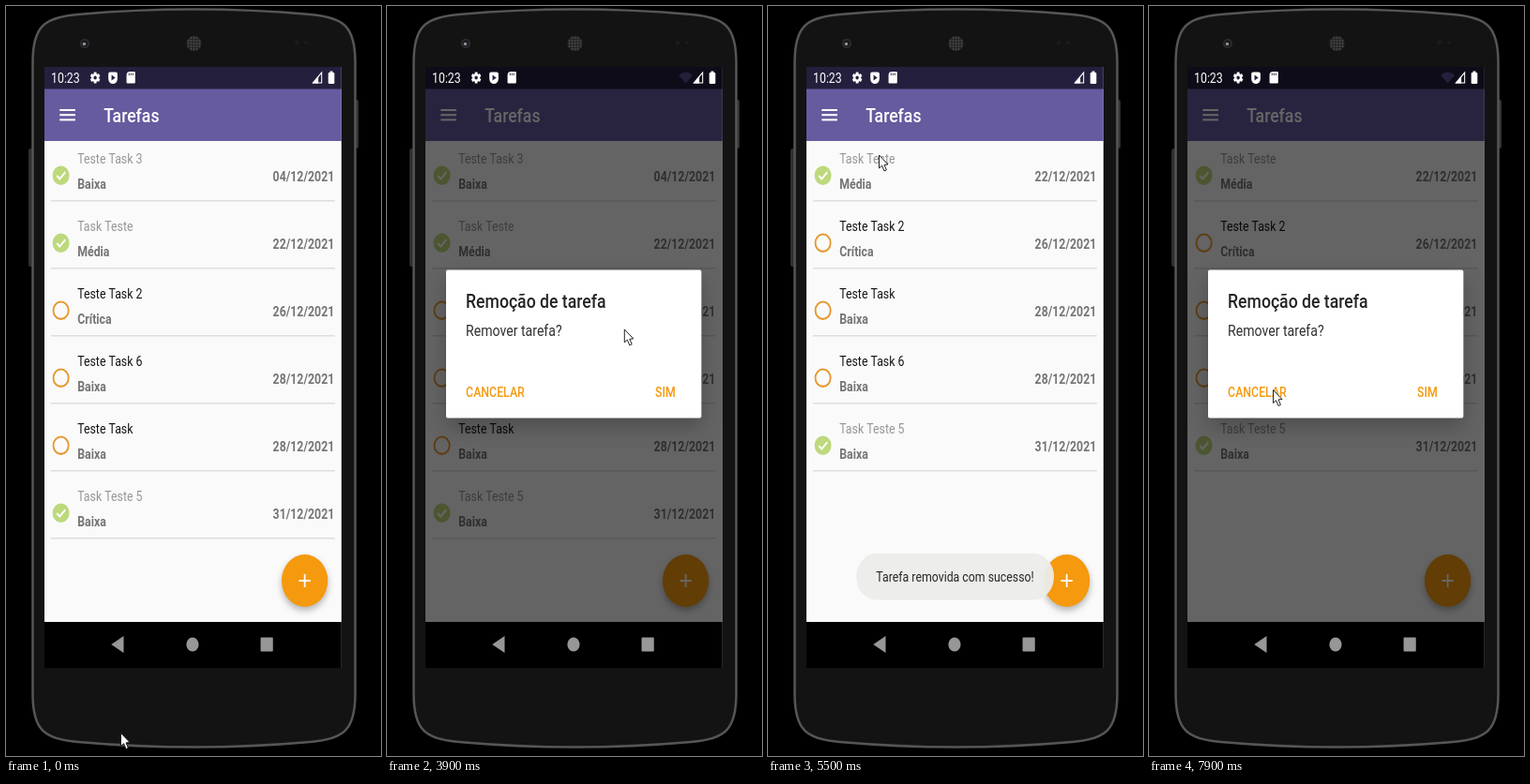
Animation of 400x800 px, one loop 8 s. Source, as an HTML page with a canvas:

```html
<!DOCTYPE html>
<html lang="pt">
<head>
<meta charset="utf-8">
<title>Tarefas</title>
<style>
html, body { margin: 0; width: 100%; height: 100%; overflow: hidden; background: #000; }
canvas { display: block; width: 400px; height: 800px; }
</style>
</head>
<body>
<canvas id="stage" width="400" height="800"></canvas>
<script>
const ctx = document.getElementById('stage').getContext('2d');
const LOOP = 8000, STEP = 100, ROW = 72;
const ORANGE = '#f5990e', GREEN = '#bdd97c', GREY = '#979797', WHITE = '#fff', BAR = '#241f3c';

const task = (title, priority, date, done) => ({ title, priority, date: date + '/12/2021', done });
const first = task('Teste Task 3', 'Baixa', '04', true);
const second = task('Task Teste', 'Média', '22', true);
const third = task('Teste Task 2', 'Crítica', '26', false);
const fourth = task('Teste Task 6', 'Baixa', '28', false);
const fifth = task('Teste Task', 'Baixa', '28', false);
const last = task('Task Teste 5', 'Baixa', '31', true);
const fullList = [first, second, third, fourth, fifth, last];
const reloadedList = [second, third, fifth, fourth, last];

// Timing
const ramp = (t, start, length) => Math.min(1, Math.max(0, (t - start) / length));
const RELOAD = 4800;

function dialogState(t) {
  const opening = t < RELOAD ? ramp(t, 2900, 200) : ramp(t, 6700, 200);
  const closing = t < RELOAD + STEP ? 1 - ramp(t, 4500, 300) ** 2.7 : 1;
  return {
    scrim: .6 * opening * closing,
    dialog: (1 - (1 - opening) ** 3.5) * closing ** 2
  };
}

const toastAlpha = t => .95 * ramp(t, RELOAD, 200) * (1 - ramp(t, 6800, 300));

// Each glide eases to its stop, with an optional sideways bow
const glides = [
  { start: 300, end: 600, x: 185, y: 57, bow: 60 },
  { start: 800, end: 1600, x: 132.5, y: 162 },
  { start: 3400, end: 4300, x: 298, y: 413 },
  { start: 4700, end: 5500, x: 118, y: 158.5 },
  { start: 6900, end: 7900, x: 132, y: 409, bow: 35 }
];

function cursorAt(t) {
  let x = 122, y = 775;
  for (const g of glides) {
    const u = ramp(t, g.start, g.end - g.start), e = 1 - (1 - u) ** 1.6;
    x += (g.x - x) * e + (g.bow || 0) * Math.sin(Math.PI * u);
    y += (g.y - y) * e;
    if (u < 1) break;
  }
  return [x, y];
}

// Drawing helpers
function rect(x, y, w, h, color) { ctx.fillStyle = color; ctx.fillRect(x, y, w, h); }

function disc(x, y, r, color) {
  ctx.fillStyle = color;
  ctx.beginPath(); ctx.arc(x, y, r, 0, 7); ctx.fill();
}

function pill(x, y, w, h, r, color) {
  ctx.fillStyle = color;
  ctx.beginPath(); ctx.roundRect(x, y, w, h, r); ctx.fill();
}

function trace(points) {
  ctx.beginPath();
  points.forEach(p => ctx.lineTo(...p));
}

function poly(points, color) {
  trace(points);
  ctx.fillStyle = color; ctx.fill();
}

function stroke(color, width) {
  ctx.strokeStyle = color; ctx.lineWidth = width; ctx.stroke();
}

function text(str, x, y, size, weight, color, align = 'left') {
  ctx.font = `${weight} ${size}px Roboto, sans-serif`;
  ctx.textAlign = align;
  ctx.fillStyle = color;
  ctx.fillText(str, x, y);
}

function layer(draw) { ctx.save(); draw(); ctx.restore(); }

function withShadow(opacity, blur, dy, draw) {
  layer(() => {
    ctx.shadowColor = `rgba(0,0,0,${opacity})`;
    ctx.shadowBlur = blur; ctx.shadowOffsetY = dy;
    draw();
  });
}

function drawBody() {
  rect(0, 0, 400, 800, '#000');
  pill(24, 152, 5, 126, 2, '#2f2f2f');
  pill(371, 100, 5, 52, 2, '#343434');

  // top half, then the same outline turned around for the bottom
  ctx.beginPath();
  for (const s of [-1, 1]) {
    const X = d => 200.5 + s * d, Y = d => 397 + s * d;
    ctx.lineTo(X(172), Y(337));
    ctx.bezierCurveTo(X(172), Y(375), X(160), Y(385), X(124), Y(388));
    ctx.quadraticCurveTo(X(0), Y(399), X(-124), Y(388));
    ctx.bezierCurveTo(X(-160), Y(385), X(-172), Y(375), X(-172), Y(337));
  }
  ctx.closePath();
  ctx.fillStyle = '#131313'; ctx.fill();
  stroke('#565656', 2.5);

  disc(84, 40, 5, '#303030');
  disc(84, 40, 3.4, '#17171c');
  disc(83.5, 40.5, 1.8, '#8d8d95');
  disc(200.5, 40, 8.2, '#262626');
  for (let x = -6; x <= 6; x += 3)
    for (let y = -6; y <= 6; y += 3)
      if (Math.hypot(x, y) < 7) disc(200.5 + x, 40 + y, .9, '#4b4b4b');
  disc(310, 39, 2.5, '#1c1a1a');
  disc(320, 39, 2, '#1c1a1a');
}

function drawStatusIcons() {
  text('10:23', 8, 82, 14, 400, WHITE);
  // gear
  for (let i = 0; i < 3; i++) layer(() => {
    ctx.translate(61.5, 76.5); ctx.rotate(i * Math.PI / 3);
    rect(-1.6, -6, 3.2, 12, WHITE);
  });
  disc(61.5, 76.5, 4.5, WHITE);
  disc(61.5, 76.5, 1.9, BAR);
  // shield
  pill(77.5, 70.5, 11, 12.5, [2, 2, 5.5, 5.5], WHITE);
  poly([[81.3, 73.5], [86, 76.5], [81.3, 79.5]], BAR);
  // memory card
  pill(99.5, 70, 10.5, 12.5, [4, 1, 1, 1], WHITE);
  for (let i = 0; i < 3; i++) rect(102 + i * 2.3, 71.5, 1, 2.5, BAR);
  // wifi, signal, battery
  ctx.beginPath();
  ctx.moveTo(315.5, 82.5);
  ctx.arc(315.5, 82.5, 12, -Math.PI * .75, -Math.PI * .25);
  ctx.fill();
  trace([[325.5, 82], [336, 71], [336, 82]]);
  ctx.closePath();
  stroke(WHITE, 1.2);
  poly([[325, 82.5], [332, 75], [332, 82.5]], WHITE);
  pill(344, 71, 7.5, 12, 1, WHITE);
  rect(346, 69.5, 3.5, 2, WHITE);
}

function drawRow({ title, priority, date, done }, y) {
  text(title, 40, y + 24, 14, 400, done ? '#969696' : '#151515');
  text(priority, 40, y + 51, 14, 700, '#757575');
  text(date, 351.5, y + 42.5, 14, 700, '#757575', 'right');
  if (done) {
    disc(20, y + 36.7, 10.2, GREEN);
    trace([[15, y + 37], [18.5, y + 40.5], [25.3, y + 33.3]]);
    stroke(WHITE, 2);
  } else {
    ctx.beginPath(); ctx.arc(20, y + 36.7, 9.2, 0, 7);
    stroke('#e6982f', 2.1);
  }
  rect(8, y + 63, 344, 1.5, '#dedede');
}

function drawApp(tasks) {
  rect(0, 65, 360, 641, '#fafafa');
  tasks.forEach((item, i) => drawRow(item, 144 + i * ROW));
  rect(0, 88, 360, 56, '#655b9e');
  rect(0, 65, 360, 23.5, BAR);
  for (let i = 0; i < 3; i++) rect(18.5, 110 + i * 5.2, 19, 2, WHITE);
  text('Tarefas', 72, 124, 20, 500, WHITE);

  withShadow(.28, 7, 4, () => disc(315.5, 613, 28, ORANGE));
  rect(308.5, 612, 14, 2, WHITE);
  rect(314.5, 606, 2, 14, WHITE);
}

function drawNavBar() {
  rect(0, 657, 360, 49, '#000');
  poly([[81, 681], [96, 672], [96, 690]], GREY);
  disc(179.5, 681, 7.5, GREY);
  pill(262, 673.5, 15, 15, 1, GREY);
}

function drawDialog(alpha) {
  layer(() => {
    ctx.globalAlpha = alpha;
    withShadow(.24, 22, 9, () => pill(25, 281.5, 309.5, 158, 2, WHITE));
    text('Remoção de tarefa', 49, 321.5, 20, 500, '#252525');
    text('Remover tarefa?', 49, 352, 16, 400, '#303030');
    text('CANCELAR', 49, 416.5, 14, 500, ORANGE);
    text('SIM', 278.5, 416.5, 14, 500, ORANGE);
  });
}

function drawToast(alpha) {
  layer(() => {
    ctx.globalAlpha = alpha;
    pill(60.5, 584, 239.5, 49.5, 24.5, '#ececea');
    text('Tarefa removida com sucesso!', 84.5, 614, 14, 400, '#1c1c1c');
  });
}

function drawCursor(x, y) {
  layer(() => {
    ctx.translate(x, y);
    poly([[.5, .5], [.5, 14.5], [3.6, 11.7], [6, 17.5], [8.4, 16.4], [6, 10.9], [10, 10.5]], WHITE);
    ctx.closePath();
    stroke('#222', 1);
  });
}

function draw(t) {
  const { scrim, dialog } = dialogState(t);
  drawBody();
  layer(() => {
    // the 360-unit screen is shown slightly narrowed
    ctx.translate(41, 0);
    ctx.scale(.88, 1);
    drawApp(t < RELOAD ? fullList : reloadedList);
    rect(0, 65, 360, 592, `rgba(0,0,0,${scrim})`);
    drawStatusIcons();
    drawDialog(dialog);
    drawToast(toastAlpha(t));
    drawNavBar();
  });
  drawCursor(...cursorAt(t));
}

function tick() {
  const t = performance.now() % LOOP;
  draw(Math.floor(t / STEP) * STEP);
  requestAnimationFrame(tick);
}
tick();
</script>
</body>
</html>
```
